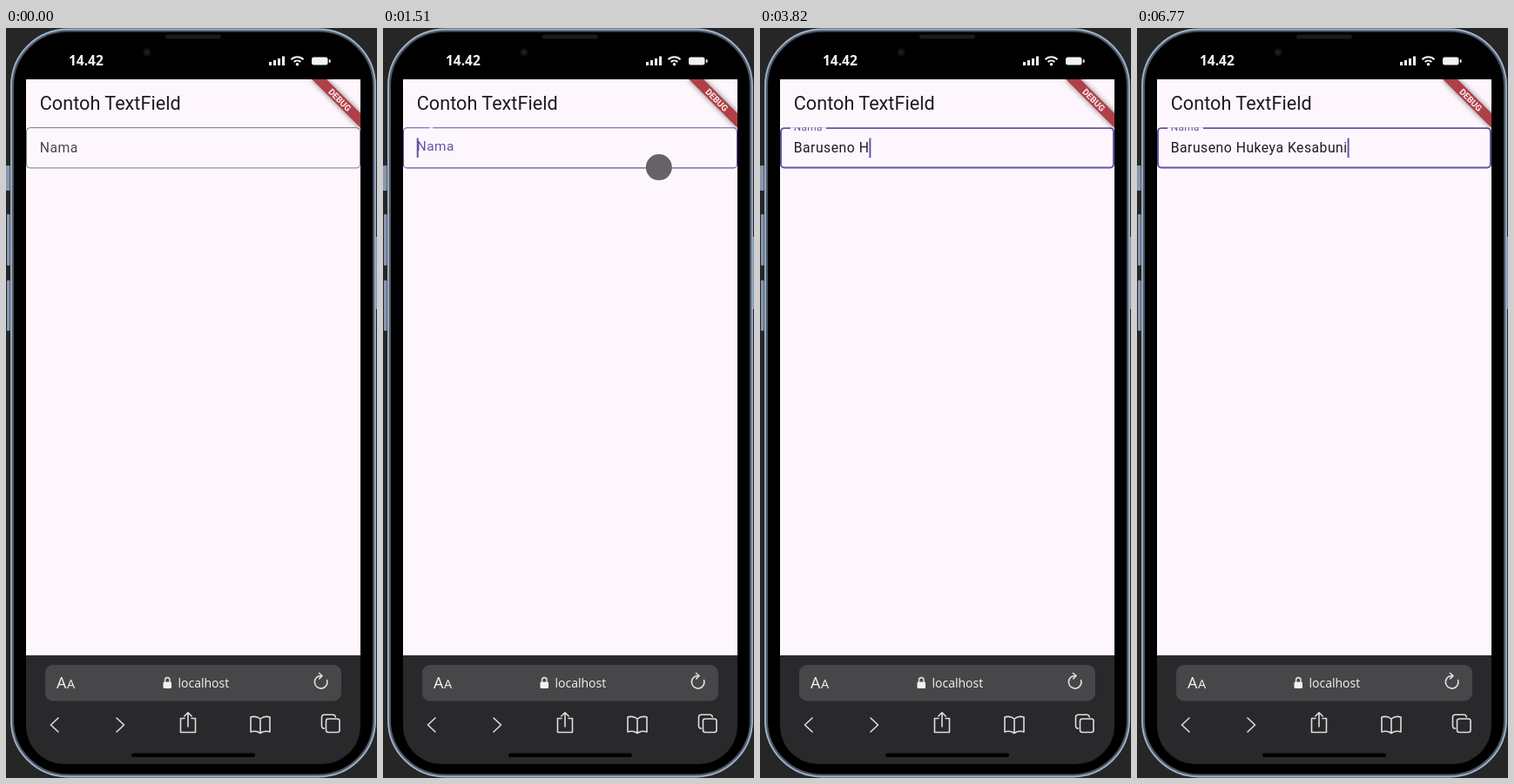
An HTML page for the animation above (7.15 s loop, 426 px wide and 862 px high).

```html
<!DOCTYPE html>
<html lang="id">
<head>
<meta charset="utf-8">
<title>Contoh TextField</title>
<style>
  html, body { margin: 0; width: 100%; height: 100%; overflow: hidden; background: #262627; }
  svg { display: block; width: 100%; height: 100%; }
  text { white-space: pre; }
  .app { font-family: Roboto, sans-serif; }
  .chrome { font-family: "Open Sans", sans-serif; fill: #f2f2f2; }
  .icon { fill: none; stroke: #dedee0; stroke-width: 1.6; stroke-linecap: round; stroke-linejoin: round; }
</style>
</head>
<body>
<svg viewBox="0 0 426 862">
  <defs>
    <clipPath id="screen"><rect width="390" height="672.8"/></clipPath>
    <clipPath id="body"><rect y="56" width="390" height="616"/></clipPath>
    <filter id="shadow" x="-20%" y="-100%" width="140%" height="300%"><feGaussianBlur stdDeviation="3"/></filter>
  </defs>

  <!-- phone body -->
  <g fill="#8798ad">
    <rect x="0" y="158" width="4.5" height="29" rx="1"/>
    <rect x="1" y="214" width="3.5" height="59" rx="1"/>
    <rect x="1" y="290" width="3.500" height="58" rx="1"/>
    <rect x="425" y="240" width="1" height="83"/>
  </g>
  <rect x="7" y="2.5" width="416" height="857" rx="64" fill="#000" stroke="#4d5866" stroke-width="4"/>
  <rect x="6" y="1.5" width="418" height="859" rx="65" fill="none" stroke="#9fb2c8" stroke-width="1.8"/>
  <rect x="183" y="7.5" width="64" height="5" rx="2.5" fill="#1a1a1c"/>
  <circle cx="162" cy="28" r="4.5" fill="#121216"/>
  <circle cx="162" cy="28" r="1.7" fill="#26262e"/>

  <!-- status bar -->
  <text class="chrome" x="72" y="43.3" font-size="15.5" font-weight="700">14.42</text>
  <g fill="#f2f2f2">
    <path d="M302 39h3v4h-3zM307 37h3v6h-3zM312 35h3v8h-3zM317 32.5h3v10.5h-3z"/>
    <rect x="351" y="33.5" width="18.5" height="9" rx="2.5"/>
    <rect x="370.8" y="36" width="1.8" height="4" rx=".9"/>
    <circle cx="334.5" cy="41.8" r="1.8"/>
    <path d="M327.5 36.2a10 10 0 0 1 14 0M330.6 39a5.7 5.7 0 0 1 7.8 0" fill="none" stroke="#f2f2f2" stroke-width="2"/>
  </g>

  <!-- app, in logical pixels -->
  <g class="app" transform="translate(23 59) scale(.9846)" clip-path="url(#screen)">
    <rect width="390" height="673" fill="#fdf7fd"/>
    <text x="16" y="35.8" font-size="22" fill="#1d1b20">Contoh TextField</text>
    <rect id="border" fill="none"/>
    <g clip-path="url(#body)">
      <rect id="gap" y="55" height="4" fill="#fdf7fd"/>
      <text id="label" x="16">Nama</text>
    </g>
    <text id="name" x="16" y="85.6" font-size="16" letter-spacing=".5" fill="#1d1b20"></text>
    <rect id="caret" y="68.5" width="2" height="23" fill="#6750a4"/>
    <g transform="translate(390 0) rotate(45)">
      <rect x="-40" y="28" width="80" height="12" opacity=".5" filter="url(#shadow)"/>
      <rect x="-60" y="28" width="120" height="12" fill="#b03f47"/>
      <text y="37.7" font-size="10.2" font-weight="700" text-anchor="middle" fill="#fbeef0">DEBUG</text>
    </g>
  </g>

  <!-- browser bar -->
  <path d="M23 721H407V802a44 44 0 0 1-44 44H67a44 44 0 0 1-44-44Z" fill="#29292b"/>
  <rect x="45" y="732" width="340" height="41.5" rx="9" fill="#474749"/>
  <g class="chrome">
    <text x="58" y="759" font-size="18">A</text>
    <text x="70" y="759" font-size="14.5">A</text>
    <text x="197.5" y="758" font-size="14">localhost</text>
    <rect x="180.5" y="751.5" width="9.5" height="7.5" rx="1.3"/>
  </g>
  <g class="icon">
    <path d="M182.6 751.5v-2.2a2.7 2.7 0 0 1 5.4 0v2.2"/>
    <path d="M368.6 749.5a7.3 7.3 0 1 1-6.2-5M359.5 741.5l3.6 3-3.3 3.4"/>
    <path d="M60 793l-8.5 8 8.5 8M127 793l8.5 8-8.5 8"/>
    <path d="M205 793.5h-4.5v16h17v-16H213M209 803v-16M204.8 791l4.2-4.2 4.2 4.2"/>
    <path d="M292 794q-5-4-11-2v17q6-2 11 1.5q5-3.5 11-1.5v-17q-6-2-11 2v16"/>
    <rect x="367.5" y="794" width="15.5" height="15.5" rx="2.5"/>
    <path d="M365.5 805a2.7 2.7 0 0 1-3-2.7v-10a3 3 0 0 1 3-3h10a2.7 2.7 0 0 1 2.8 2.7"/>
  </g>
  <rect x="144" y="833.5" width="142" height="4.5" rx="2.25"/>

  <circle id="touch" r="15" fill="#656368"/>
</svg>
<script>
const LOOP = 7150;
const NAME = 'Baruseno Hukeya Kesabuni';
const KEYS = [2230, 2440, 2580, 2690, 2790, 3090, 3160, 3230, 3440, 3720, 3920, 4130,
  4230, 4330, 4470, 4740, 4780, 5020, 5190, 5400, 5490, 5600, 5700, 5810];
const FOCUS = 1480;

const [border, gap, label, name, caret, touch] =
  ['border', 'gap', 'label', 'name', 'caret', 'touch'].map(id => document.getElementById(id));

const set = (el, attrs) => { for (const k in attrs) el.setAttribute(k, attrs[k]); };
const mix = (a, b, p) => a + (b - a) * p;
const within = (t, a, b) => t >= a && t < b;
const progress = (t, a, b) => Math.min(1, Math.max(0, (t - a) / (b - a)));
const easeOut = p => 1 - (1 - p) ** 3;
const easeInOut = p => p * p * (3 - 2 * p);

function draw(t) {
  const focused = t >= FOCUS;
  const float = easeInOut(progress(t, FOCUS, FOCUS + 167));

  // outline stays inside the field as it thickens
  const w = mix(1, 2, float);
  set(border, {
    x: w / 2, y: 56 + w / 2, width: 390 - w, height: 48 - w, rx: 4,
    'stroke-width': w, stroke: focused ? '#6750a4' : '#79747e'
  });
  set(gap, { x: mix(33, 12.2, float), width: 41.6 * float });
  set(label, {
    y: mix(85.6, 60.4, float), 'font-size': mix(16, 12, float),
    'letter-spacing': mix(.5, .375, float), fill: focused ? '#6750a4' : '#49454f'
  });

  name.textContent = NAME.slice(0, KEYS.filter(k => k <= t).length);
  set(caret, {
    x: 16 + (name.textContent ? name.getComputedTextLength() : 0),
    visibility: focused && !within(t, 1960, 2230) && !within(t, 6260, 6740) ? 'visible' : 'hidden'
  });

  const enter = easeOut(progress(t, 720, 1010));
  set(touch, {
    cx: mix(401, 317, enter) - 2 * float,
    cy: mix(192, 161, enter) - 10 * float,
    visibility: within(t, 720, 3480) ? 'visible' : 'hidden'
  });
}

const start = performance.now();
function tick() {
  draw((performance.now() - start) % LOOP);
  requestAnimationFrame(tick);
}
tick();
</script>
</body>
</html>
```
